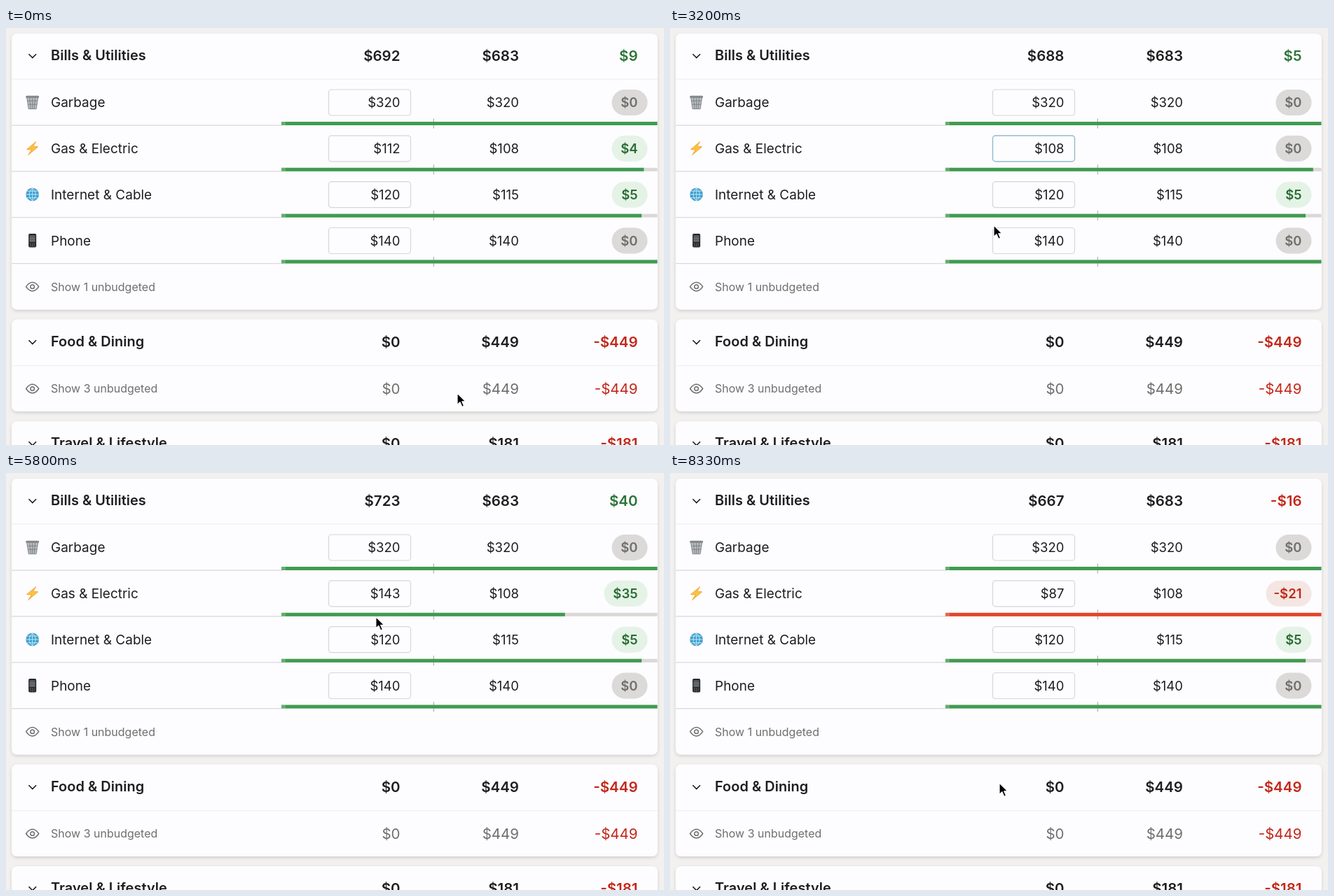
An HTML page for the animation above (8400 ms loop, 939x596 px).

```html
<!DOCTYPE html>
<html lang="en">
<head>
<meta charset="utf-8">
<title>Budget</title>
<style>
  html, body { margin: 0; width: 100%; height: 100%; overflow: hidden; background: #f2f1ef; }
  svg { display: block; font-family: Inter, "Liberation Sans", sans-serif; cursor: default; }
</style>
</head>
<body>
<svg width="939" height="596" viewBox="0 0 939 596">
  <defs>
    <filter id="shadow" x="-5%" y="-10%" width="110%" height="125%">
      <feDropShadow dx="0" dy="2" stdDeviation="2" flood-opacity=".14"/>
    </filter>
  </defs>
  <g id="base"></g>
  <g id="live"></g>
</svg>
<script>
const LOOP = 8400, SPENT = 108, OTHER_BUDGETS = 580, TOTAL_SPENT = 683;
const INK = '#1f1e1f', GREY = '#706e6d', PAPER = '#fdfcfe', GREEN = '#3f9b50', RED = '#c2281a';
const ROWS = [106.5, 172.3, 238.2, 304];

// Each visit opens the history popup and picks a new budget on closing.
const VISITS = [
  { open: 1850, close: 3030, value: 108 },
  { open: 4060, close: 5400, value: 143 },
  { open: 6200, close: 7600, value: 87 }
];
const PATH = [
  [0, 644, 522], [480, 644, 522], [1350, 547, 169], [2050, 547, 169], [2700, 462, 282],
  [3220, 462, 282], [3850, 545, 173], [4350, 545, 173], [4950, 422, 425], [5500, 422, 425],
  [5890, 544, 172], [6350, 544, 172], [6950, 470, 445], [7700, 470, 445], [8000, 470, 443], [LOOP, 470, 443]
];
const MONTHS = [['JUN', 108], ['JUL', 84], ['AUG', 96], ['SEP', 143], ['OCT', 87], ['NOV', 130]];
const BARS = MONTHS.map(([name, value], i) => {
  const h = value * 103.5 / 160;
  return { name, value, x: 263.7 + i * 48.25, y: 471 - h, w: 28.5, h };
});
const AVERAGE = { x: 383.5, y: 250, w: 175.5, h: 68 };

const clamp = u => Math.max(0, Math.min(1, u));
const smooth = u => (u = clamp(u), u * u * (3 - 2 * u));
const mix = (a, b, u) => a + (b - a) * u;
const money = n => (n < 0 ? '-$' : '$') + Math.abs(n);
const inside = (p, r) => p.x >= r.x && p.x <= r.x + r.w && p.y >= r.y && p.y <= r.y + r.h;

const text = (s, x, y, size, fill = INK, weight = 400, anchor = 'start', extra = '') =>
  `<text x="${x}" y="${y}" font-size="${size}" fill="${fill}" font-weight="${weight}" text-anchor="${anchor}" ${extra}>${s.replace('&', '&amp;')}</text>`;
const rect = (x, y, w, h, fill, r = 0, extra = '') =>
  `<rect x="${x}" y="${y}" width="${w}" height="${h}" rx="${r}" fill="${fill}" ${extra}/>`;
const path = (d, stroke, width, fill = 'none', extra = '') =>
  `<path d="${d}" stroke="${stroke}" stroke-width="${width}" fill="${fill}" ${extra}/>`;
const at = (x, y, s) => `<g transform="translate(${x} ${y})">${s}</g>`;

const total = (s, x, y, fill, weight = 600) => text(s, x, y, 20.5, fill, weight, 'end');
const diffColor = n => n < 0 ? RED : '#2b7437';

function badge(n, c) {
  const [bg, fg] = n > 0 ? ['#e4f3e6', '#2a6c35'] : n < 0 ? ['#f4e6e2', RED] : ['#dcdad8', GREY];
  const label = money(n), w = [51, 62, 65][label.length - 2];
  return rect(915.5 - w, c - 18.5, w, 37, bg, 18.5) + text(label, 901.5, c + 6.5, 18.5, fg, 600, 'end');
}
function progress(ratio, c, fill = GREEN) {
  const y = c + 27.5;
  return rect(609.7, c + 23, 1.3, 14, '#b4b3b3') +
    rect(393, y, 536.5, 5, '#dbd9d7') +
    rect(393, y, 538.5 * Math.min(1, ratio) - 2, 5, fill) +
    rect(393, y, 6, 5, '#fff', 0, 'opacity=".18"');
}
const inputBox = (c, stroke = '#d6d5d7') =>
  rect(460.5, c - 18.5, 117, 37, PAPER, 4, `stroke="${stroke}" stroke-width="1.2"`);
const amount = (s, x, c) => text(s, x, c + 6.7, 18.5, INK, 400, 'end');

const chevron = y => path(`M32.5 ${y - 2.7}l5.3 5.3 5.3 -5.3`, INK, 1.6);
const eye = y => at(37.7, y, path('M-9 0Q-5 -6.2 0 -6.2T9 0Q5 6.2 0 6.2T-9 0Z', GREY, 1.5) +
  `<circle r="2.8" fill="none" stroke="${GREY}" stroke-width="1.5"/>`);

const ICONS = [
  path('M-8 -7L-5.5 9.5H5.5L8 -7Z', '#85898b', 1, '#b9bdbf') +
    path('M-4 -6L-2.5 9M0 -6V9M4 -6L2.5 9M-7 -2H7M-6.3 3H6.3', '#777b7d', .9) +
    rect(-9.5, -9.5, 19, 3.2, '#85898b', 1.5),
  path('M5 -9.5L-8 1.5L-1.2 2L-6 9.5L8 -2.2L1 -2.8Z', '#ef9a2c', .8, '#fbc23c'),
  '<circle r="9.3" fill="#3b9fd0"/>' +
    path('M-9 0H9M0 -9V9M-7.6 -4.8H7.6M-7.6 4.8H7.6M0 -9C-6 -5 -6 5 0 9M0 -9C6 -5 6 5 0 9', '#d5edf7', .9),
  rect(-5.5, -9.8, 11, 19.6, '#252629', 1.8) + rect(-4, -7.5, 8, 10, '#575c60') +
    path('M-3.5 5H3.5M-3.5 7.5H3.5M-4 -3H4M-4 0H4', '#8d9295', .9, 'none', 'stroke-dasharray="1.8 1"')
];

function drawBase() {
  const card = (y, h) => rect(8, y, 922, h, PAPER, 8, 'filter="url(#shadow)"');
  const line = (y, w, fill) => rect(8, y, w, 1.2, fill);
  const header = (name, y, spent) => chevron(y - 8) + text(name, 64, y - 2, 20, INK, 600) +
    (spent ? total('$0', 562.5, y - 1, INK) + total(money(spent), 732, y - 1, INK) +
      total(money(-spent), 901.5, y - 1, RED) : '');
  const hidden = (n, c) => eye(c) + text(`Show ${n} unbudgeted`, 64, c + 5.8, 16, GREY);

  let s = card(8, 394.5) + card(416.5, 131.5) + card(562, 80);
  s += header('Bills & Utilities', 48) + total(money(TOTAL_SPENT), 732, 47, INK) + line(72.5, 922, '#f0eff0');
  [['Garbage', 320, 320], ['Gas & Electric', 0, SPENT], ['Internet & Cable', 120, 115], ['Phone', 140, 140]]
    .forEach(([name, budget, spent], i) => {
      const c = ROWS[i];
      s += at(37.7, c - .3, ICONS[i]) + text(name, 64, c + 6.5, 19) + amount(money(spent), 732, c) +
        line(c + 32, 386, '#d9d8d9');
      if (budget) s += inputBox(c) + amount(money(budget), 562.5, c) +
        badge(budget - spent, c) + progress(spent / budget, c);
    });
  s += hidden(1, 369.7);
  s += header('Food & Dining', 457, 449) + line(482, 922, '#f0eff0') + hidden(3, 515.5) +
    total('$0', 562.5, 522.5, GREY, 400) + total('$449', 732, 522.5, GREY, 400) + total('-$449', 901.5, 522.5, RED, 400);
  return s + header('Travel & Lifestyle', 602, 181);
}

function popup(alpha, p) {
  const stat = (r, value, label, hot) => rect(r.x, r.y, r.w, r.h, hot ? '#e9e7e5' : '#f3f2f1', 8) +
    text(value, r.x + 13.5, 278, 13.5, INK, 600) + text(label, r.x + 13.5, 303, 14, GREY);
  let s = rect(178.5, 201.5, 399, 361, PAPER, 7, 'stroke="#c5c4c5" filter="url(#shadow)"') +
    text('History', 197.5, 234, 15.6, INK, 600) +
    stat({ ...AVERAGE, x: 198 }, '$130', 'Spent last month') +
    stat(AVERAGE, '$108', 'Monthly average', inside(p, AVERAGE)) +
    rect(198, 327, 360.5, 179, '#f3f2f1', 8);
  [160, 80, 0].forEach((n, i) => {
    const y = 367.3 + i * 51.75;
    s += rect(254, y, 290, 1, '#dcdad9') + text('$' + n, 249.5, y + 5, 13, GREY, 500, 'end', 'letter-spacing=".3"');
  });
  for (const b of BARS) {
    const hot = inside(p, b), mid = b.x + b.w / 2;
    s += path(`M${b.x} 471V${b.y + 6}q0 -6 6 -6h${b.w - 12}q6 0 6 6V471Z`, 'none', 0, hot ? '#d73219' : '#e13e25') +
      text(b.name, mid + .5, 494, 12.3, GREY, 500, 'middle', 'letter-spacing="1"');
    if (hot) s += text(money(b.value), mid - 2, b.y - 10, 13.5, INK, 600, 'middle');
  }
  s += rect(197.5, 525, 19, 19, '#f45b1c', 4) + path('M203 535l2.8 2.8 5.5 -6', '#fff', 1.3) +
    text('Apply budget changes to all future months', 226, 538, 13.9);
  const k = .95 + .05 * alpha;
  return `<g opacity="${alpha}" transform="translate(577.5 201) scale(${k}) translate(-577.5 -201)">${s}</g>`;
}

const POINTERS = {
  arrow: path('M0 0V16.5L4 12.8L6.8 19.4L9.6 18.2L6.8 11.8H11.8Z', '#fff', 1.2, '#000', 'stroke-linejoin="round"'),
  beam: ['#fff', '#111'].map((c, i) =>
    path('M-4 -9Q0 -9 0 -6.5Q0 -9 4 -9M-4 9Q0 9 0 6.5Q0 9 4 9M0 -7V7M-2 2.5H2', c, i ? 1.3 : 3)).join(''),
  hand: path('M-2 1Q-2 -1 0 -1T2 1V6Q3 4.6 5 5.8Q7 5 8.2 6.8Q11.5 6 11.5 9.5V13L9.5 18H1L-3.5 11.5Q-5 9 -3.5 8.5T-2 9.5Z',
    '#111', 1.2, '#fff') + path('M3.2 11V15M5.8 11V15M8.3 11V15', '#111', 1)
};

function pointerAt(t) {
  const i = PATH.findIndex((k, n) => n && t <= k[0]);
  const [t0, x0, y0] = PATH[i - 1], [t1, x1, y1] = PATH[i], u = smooth((t - t0) / (t1 - t0));
  return { x: mix(x0, x1, u), y: mix(y0, y1, u) };
}

function drawLive(t) {
  const c = ROWS[1], p = pointerAt(t);
  let budget = 112, before = 112, changed = -1e4, alpha = 0, focus = 0, opened = 0, active = false;
  for (const v of VISITS) {
    if (t >= v.close) [before, budget, changed] = [budget, v.value, v.close];
    if (t >= v.open) {
      active = t < v.close;
      opened = v.open;
      alpha = active ? clamp((t - v.open) / 160) : 1 - clamp((t - v.close) / 120);
      focus = active ? clamp((t - v.open) / 80) : 1 - clamp((t - v.close) / 270);
    }
  }
  const diff = OTHER_BUDGETS + budget - TOTAL_SPENT;
  const ratio = mix(Math.min(1, SPENT / before), Math.min(1, SPENT / budget), smooth((t - changed) / 400));
  const value = money(budget);
  const inputRow = ROWS.find(r => inside(p, { x: 460, y: r - 19, w: 118, h: 38 }));
  const inField = inputRow && (alpha < .5 || inputRow === c);

  let s = total(money(OTHER_BUDGETS + budget), 562.5, 47, INK) + total(money(diff), 901.5, 47, diffColor(diff));
  s += badge(budget - SPENT, c) + progress(ratio, c, budget < SPENT ? '#e2442a' : GREEN) + inputBox(c);
  if (inField) s += rect(460.5, inputRow - 18.5, 117, 37, 'none', 4, 'stroke="#a5a4a6" stroke-width="1.2"');
  if (focus) {
    const grow = active ? .5 : 0;
    s += rect(460.5 - grow, c - 18.5 - grow, 117 + 2 * grow, 37 + 2 * grow, 'none', 4,
      `stroke="#1b8dba" stroke-width="${active ? 2.2 : 1.4}" opacity="${focus}"`);
  }
  if (active) {
    const full = value === '$112' ? 37 : 42.5;
    s += rect(563 - full, c - 11, t - opened < 130 ? 19 : full, 23, '#abd0f6');
  }
  s += amount(value, 562.5, c);
  if (alpha) s += popup(alpha, p);

  const clickable = alpha > .5 && [AVERAGE, ...BARS].some(r => inside(p, r));
  return s + at(p.x, p.y, POINTERS[clickable ? 'hand' : inField ? 'beam' : 'arrow']);
}

const live = document.getElementById('live');
document.getElementById('base').innerHTML = drawBase();
const start = performance.now();
function frame() {
  live.innerHTML = drawLive((performance.now() - start) % LOOP);
  requestAnimationFrame(frame);
}
frame();
</script>
</body>
</html>
```
